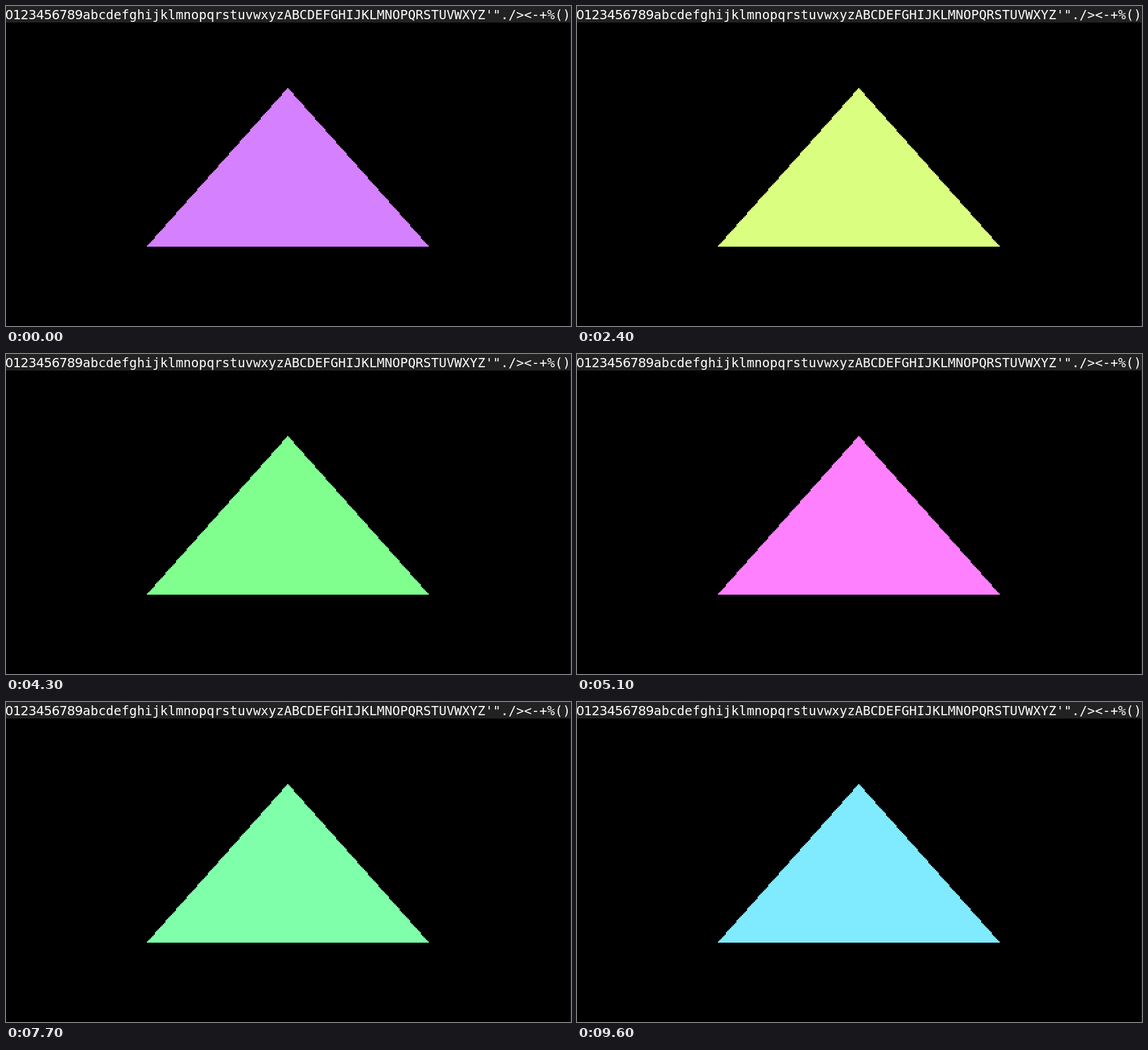
An HTML page that plays this animation: 854 px wide and 484 px high, repeating every 9700 ms.

```html
<!DOCTYPE html>
<html lang="en">
<head>
<meta charset="utf-8">
<title>Hue triangle</title>
<style>
  html, body { margin: 0; width: 100%; height: 100%; overflow: hidden; background: #000; }
  svg { display: block; }
  text { font: 19.4px "DejaVu Sans Mono", monospace; fill: #fff; white-space: pre; }
  .digit { font-family: "DejaVu Sans", sans-serif; }
</style>
</head>
<body>
<svg width="854" height="484" viewBox="0 0 854 484">
  <g fill="#222">
    <rect width="854" height="25"/>
    <rect x="853" width="1" height="484"/>
  </g>
  <g id="line" text-anchor="middle"></g>
  <path id="tri" shape-rendering="crispEdges"/>
</svg>
<script>
  const STEP = 100, STEPS = 97;
  const START_HUE = 280, HUE_STEP = 21.56;
  const CELL = 11.7, BASELINE = 20;
  const PIXEL = 2, ROWS = 120, HALF_BASE = 106.75, LEFT = 425, TOP = 124;
  const chars = '0123456789abcdefghijklmnopqrstuvwxyzABCDEFGHIJKLMNOPQRSTUVWXYZ\'"./><-+%()';

  const line = document.getElementById('line');
  const tri = document.getElementById('tri');

  [...chars].forEach((ch, i) => {
    const t = document.createElementNS(line.namespaceURI, 'text');
    t.setAttribute('x', (i + 0.5) * CELL - 1);
    t.setAttribute('y', BASELINE);
    if (ch >= '0' && ch <= '9') t.setAttribute('class', 'digit');
    t.textContent = ch;
    line.append(t);
  });

  // The triangle is built from rows of doubled pixels.
  let path = '';
  for (let row = 0; row < ROWS; row++) {
    const n = Math.floor(HALF_BASE * (row + 0.5) / ROWS);
    const width = PIXEL * (2 * n + 1);
    path += `M${LEFT - PIXEL * n},${TOP + PIXEL * row}h${width}v${PIXEL}h${-width}z`;
  }
  tri.setAttribute('d', path);

  const t0 = performance.now();

  function draw(now) {
    const step = Math.floor(Math.max(0, now - t0) / STEP) % STEPS;
    const hue = (START_HUE + step * HUE_STEP) % 360;
    tri.style.fill = `hsl(${hue}, 100%, 75%)`;
    requestAnimationFrame(draw);
  }
  draw(t0);
</script>
</body>
</html>
```
